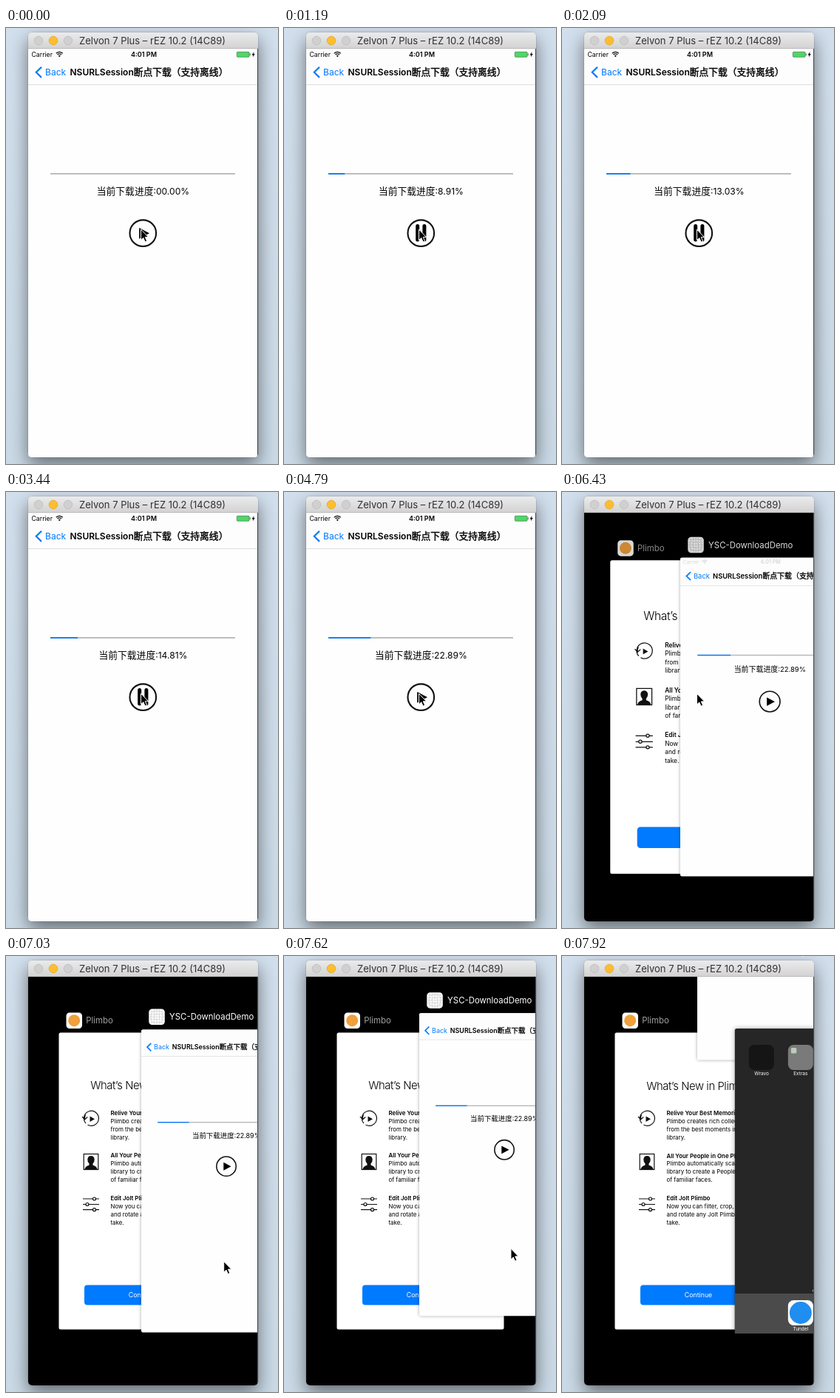
An HTML page that plays this animation: 368 by 589 pixels, repeating every 8000 ms.

```html
<!DOCTYPE html>
<html lang="zh">
<head>
<meta charset="utf-8">
<title>Download demo</title>
<style>
html, body { margin: 0; width: 100%; height: 100%; overflow: hidden; background: #cddce8; }
svg { display: block; width: 368px; height: 589px; }
text { font-family: Inter, Roboto, sans-serif; white-space: pre; }
.cjk { font-family: "Noto Sans CJK SC", "Noto Sans CJK", sans-serif; font-size: 12.77px; }
.heavy { font-weight: 400; stroke: #000; stroke-width: .4px; }
.mid { text-anchor: middle; }
.bold { font-weight: 600; }
.line { fill: none; stroke: #111; }
.body { font-size: 7.9px; }
.app { font-size: 6.5px; fill: #fff; text-anchor: middle; }
.label { font-size: 11.4px; }
.window { filter: drop-shadow(0 10px 12px rgba(0, 0, 0, .5)); }
.card { filter: drop-shadow(0 0 3px rgba(0, 0, 0, .35)); }
</style>
</head>
<body>
<svg viewBox="0 0 368 589">
  <defs>
    <linearGradient id="desk" x2="0" y2="1">
      <stop stop-color="#d2dfed"/><stop offset="1" stop-color="#cadae6"/>
    </linearGradient>
    <linearGradient id="bar" x2="0" y2="1">
      <stop stop-color="#ebebeb"/><stop offset="1" stop-color="#d2d2d2"/>
    </linearGradient>
    <clipPath id="frame"><rect x="30" y="6" width="311" height="574" rx="5"/></clipPath>
    <clipPath id="screen"><rect x="30" y="28" width="310" height="552"/></clipPath>
  </defs>

  <rect width="368" height="589" fill="url(#desk)"/>
  <rect class="window" x="30" y="6" width="311" height="574" rx="5" fill="#fff" stroke="#000" stroke-opacity=".3" stroke-width=".6"/>

  <g clip-path="url(#frame)">
    <rect x="340" y="28" width="1" height="552" fill="#4a4a4a"/>
    <g clip-path="url(#screen)">
      <rect id="back" x="30" y="28" width="311" height="552" fill="#fff"/>

      <!-- welcome card -->
      <g id="welcome">
        <rect width="226" height="401" rx="2.5" fill="#fff"/>
        <text class="mid" x="113" y="77" font-size="14.8" font-weight="300" letter-spacing="-.4">What’s New in Plimbo</text>
        <g id="rows"></g>
        <g class="line" stroke-width="1.2">
          <path d="M36.5 122.5 A10 10 0 1 1 39 124.5 M31.5 113.5 L35 117.5 L38.8 114 M35 117 A10 10 0 0 1 36 111"/>
          <path d="M42 113 L48.5 116.7 L42 120.4 Z" fill="#111" stroke="none"/>
          <rect x="33.7" y="164" width="19.6" height="21"/>
          <path d="M35 184.5 Q35.5 180.5 41 179 V177 Q38.5 174.5 38.8 171 Q39.5 166.6 43.5 166.6 Q47.5 166.6 48.2 171 Q48.5 174.5 46 177 V179 Q51.5 180.5 52 184.5 Z" fill="#111" stroke="none"/>
          <path d="M32.5 224.5 H54.5 M32.5 232 H54.5 M32.5 239.2 H54.5"/>
          <g fill="#fff"><circle cx="48" cy="224.5" r="2"/><circle cx="38.5" cy="232" r="2"/><circle cx="48" cy="239.2" r="2"/></g>
        </g>
        <rect x="34.5" y="341" width="157" height="27" rx="4" fill="#007aff"/>
        <text class="mid" x="113" y="357.8" font-size="8.8" fill="#fff">Continue</text>
      </g>
      <g id="welcomeTag">
        <rect width="21.5" height="21.5" rx="4.5" fill="#fff"/>
        <circle cx="10.7" cy="10.7" r="8" fill="#f0a03c"/>
        <text class="label" x="26.7" y="14.8" fill="#a0a0a0">Plimbo</text>
      </g>

      <!-- download screen -->
      <g id="demo">
        <rect width="311" height="552" rx="3" fill="#fefefe"/>
        <rect width="311" height="48.5" rx="3" fill="#fdfdfd"/>
        <path d="M0 48.6 H311" stroke="#d4d4d4" stroke-width=".8"/>
        <g transform="translate(-30 -28)">
          <g id="status">
            <text x="34.5" y="39.2" font-size="8.7">Carrier</text>
            <path class="line" stroke-width="1.3" d="M67.8 34.2 Q72.3 30.4 76.8 34.2 M69.5 36.1 Q72.3 33.6 75.1 36.1"/>
            <path d="M70.8 37.4 Q72.3 36.2 73.8 37.4 L72.3 39.2 Z"/>
            <text class="mid bold" x="186.5" y="39.2" font-size="9">4:01 PM</text>
            <rect x="312.3" y="32.3" width="16.8" height="7" rx="1.2" fill="#4cd964" stroke="#555" stroke-width=".6"/>
            <path d="M330.2 34.4 V37.2" stroke="#555"/>
            <path d="M335.6 32 L332.6 36.4 H334.4 L333.8 39.6 L336.8 35 H335 Z"/>
          </g>
          <path d="M48 52.7 L40.8 59.8 L48 66.9" fill="none" stroke="#007aff" stroke-width="2.2"/>
          <text x="53" y="64.2" font-size="12.1" fill="#007aff">Back</text>
          <text class="bold" x="86.5" y="64.2" font-size="12">NSURLSession<tspan class="cjk heavy">断点下载（支持离线）</tspan></text>
          <rect x="60" y="196" width="250" height="1.8" fill="#b6b6b6"/>
          <rect id="fill" x="60" y="196" height="1.8" fill="#007aff"/>
          <text class="mid" x="185.5" y="225.2" font-size="12.1"><tspan class="cjk">当前下载进度</tspan><tspan id="percent"></tspan></text>
          <circle class="line" cx="185.3" cy="277.2" r="17.8" stroke-width="2.1"/>
          <path id="play" d="M180.2 269.9 L194 277.3 L180.2 284.7 Z"/>
          <path id="pause" d="M180.7 267.4 V286 M189.9 267.4 V286" stroke="#000" stroke-width="5" stroke-linecap="round"/>
        </g>
      </g>
      <g id="demoTag">
        <rect width="21.5" height="21.5" rx="4.5" fill="#fff"/>
        <path class="line" style="stroke:#c4c4c4" stroke-width=".5" d="M3.6 0 V21.5 M7.2 0 V21.5 M10.75 0 V21.5 M14.3 0 V21.5 M17.9 0 V21.5 M0 3.6 H21.5 M0 7.2 H21.5 M0 10.75 H21.5 M0 14.3 H21.5 M0 17.9 H21.5"/>
        <g class="line" style="stroke:#c4c4c4" stroke-width=".5"><circle cx="10.75" cy="10.75" r="4.2"/><circle cx="10.75" cy="10.75" r="8.6"/></g>
        <text class="label" x="27.8" y="14.8" fill="#fff">YSC-DownloadDemo</text>
      </g>

      <!-- home screen -->
      <g id="home">
        <rect width="232" height="412" rx="2.5" fill="#262626"/>
        <path d="M0 358 H232 V412 H0 Z" fill="#4b4b4b"/>
        <circle cx="106.5" cy="354" r="1.6" fill="#aaa"/>
        <rect x="19" y="22" width="34" height="34" rx="7.5" fill="#151515"/>
        <text class="app" x="36.3" y="62.5">Wravo</text>
        <rect x="72" y="22" width="34" height="34" rx="7.5" fill="#7a7a7a"/>
        <rect x="76" y="26" width="7.5" height="7.5" rx="1.6" fill="#b9cdb9"/>
        <text class="app" x="89" y="62.5">Extras</text>
        <rect x="72" y="367" width="34" height="34" rx="7.5" fill="#fff"/>
        <circle cx="89" cy="384" r="15" fill="#1f8ef0"/>
        <text class="app" x="89" y="408">Tundel</text>
      </g>
    </g>

    <rect x="30" y="6" width="311" height="22" fill="url(#bar)"/>
    <path d="M30 27.7 H341" stroke="#b0b0b0" stroke-width=".7"/>
    <g stroke-width=".7">
      <circle cx="44" cy="17" r="5.8" fill="#d0d0d0" stroke="#b9b9b9"/>
      <circle cx="64" cy="17" r="5.8" fill="#fdbe30" stroke="#dfa023"/>
      <circle cx="84" cy="17" r="5.8" fill="#d0d0d0" stroke="#b9b9b9"/>
    </g>
    <text class="mid" x="198" y="21.7" font-size="13" fill="#303030">Zelvon 7 Plus – rEZ 10.2 (14C89)</text>
  </g>

  <path id="cursor" d="M0 0 V14.6 L3.3 11.5 L5.6 16.8 L8.1 15.7 L5.8 10.5 H10.2 Z" stroke="#fff" stroke-width="1"/>
</svg>

<script>
const LOOP = 8000;
const SWITCH = 6290;
const $ = id => document.getElementById(id);
const mix = (a, b, p) => a + (b - a) * p;

const rows = [
  [111.5, "Relive Your Best Memories", "Plimbo creates rich collections", "from the best moments in your", "library."],
  [169, "All Your People in One Place", "Plimbo automatically scans your", "library to create a People album", "of familiar faces."],
  [226.5, "Edit Jolt Plimbo", "Now you can filter, crop, adjust", "and rotate any Jolt Plimbo you", "take."]
];
$("rows").innerHTML = rows.map(([y, ...lines]) => lines.map((line, i) =>
  `<text class="body${i ? "" : " bold"}" x="70" y="${y + i * 10.9}">${line}</text>`).join("")).join("");

const progress = [[140, 0], [1190, 8.91], [2390, 14.4], [3439, 14.4], [3440, 14.81], [4790, 22.89]];
const pointer = [
  [0, 182.5, 272], [6430, 182.5, 272.5], [6580, 195, 290], [6730, 225, 330], [6880, 268, 380],
  [7026, 294.7, 412.7], [7180, 303, 420], [7330, 305, 422], [7475, 307, 395],
  [7624, 311, 290], [7773, 315, 130], [7920, 319.3, -16]
];

// Linear value of column c in a list of keys, held at both ends
function track(keys, t, c = 1) {
  const i = keys.findIndex(k => k[0] > t);
  if (i < 0) return keys[keys.length - 1][c];
  if (i === 0) return keys[0][c];
  const a = keys[i - 1], b = keys[i];
  return mix(a[c], b[c], (t - a[0]) / (b[0] - a[0]));
}

function snap(t) {
  const [start, step] = t < 6430 ? [290, 150] : [6430, 149];
  return start + Math.floor((t - start) / step) * step;
}

function spring(t) {
  const x = Math.max(0, t) * 0.01465;
  return 1 - (1 + x) * Math.exp(-x);
}

function place(id, x, y, scale = 1) {
  $(id).setAttribute("transform", `translate(${x} ${y}) scale(${scale})`);
}

function show(id, on) {
  $(id).style.display = on ? "" : "none";
}

function render(time) {
  const t = snap(time);
  const done = track(progress, t);
  const running = (t >= 290 && t < 2390) || (t >= 3440 && t < 4790);
  $("fill").setAttribute("width", done * 2.5);
  $("percent").textContent = `:${done ? done.toFixed(2) : "00.00"}%`;
  show("play", !running);
  show("pause", running);

  const px = track(pointer, t, 1), py = track(pointer, t, 2);
  place("cursor", px, py);

  const open = t >= SWITCH;
  const p = open ? spring(t - 6200) : 0;
  const lift = t > 7330 ? (422 - py) * 0.84 : 0;
  for (const id of ["welcome", "welcomeTag", "demoTag", "home"]) show(id, open);
  for (const id of ["demo", "home"]) $(id).classList.toggle("card", open);
  $("back").setAttribute("fill", open ? "#000" : "#fff");
  $("status").style.opacity = 1 - p;
  $("welcomeTag").style.opacity = $("demoTag").style.opacity = p;

  const wx = mix(30, 71.5, p), wy = mix(28, 103.5, p);
  place("welcome", wx, wy, mix(311 / 226, 1, p));
  place("welcomeTag", wx + 10, wy - 27);
  const dx = mix(30, 183, p), dy = mix(28, 99.5, p) - lift;
  place("demo", dx, dy, mix(1, 0.741, p));
  place("demoTag", dx + 10.3, dy - 28);
  place("home", 413 - lift * 0.487, 98);
}

const begin = performance.now();
function tick() {
  render((performance.now() - begin) % LOOP);
  requestAnimationFrame(tick);
}
tick();
</script>
</body>
</html>
```
